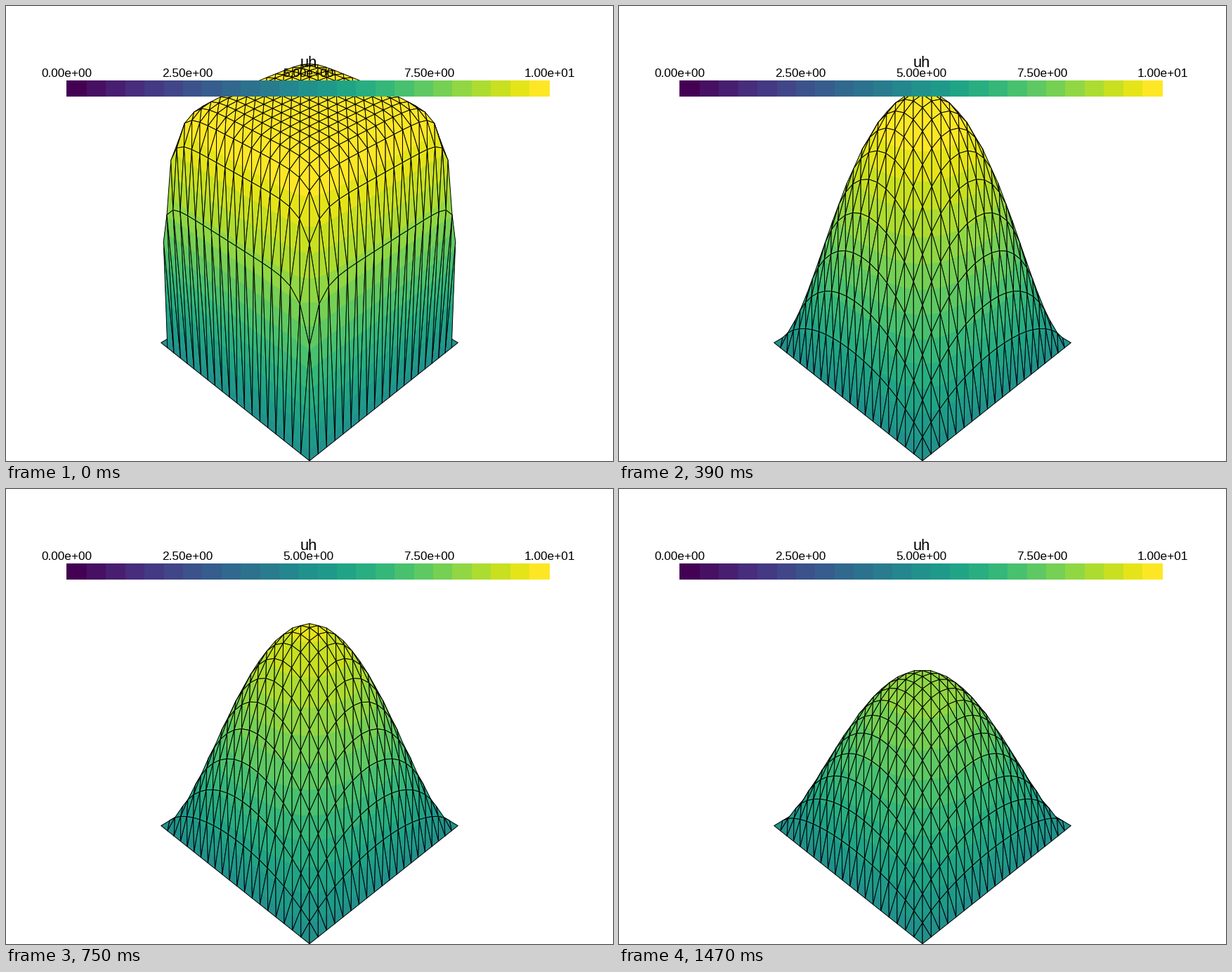
Recreate the animation shown at these times as a matplotlib script. Size 864x648 px, loop 1.5 s.

```python
import numpy as np
import matplotlib
import matplotlib.pyplot as plt
from matplotlib.animation import FuncAnimation
from matplotlib.collections import PolyCollection

W, H, DPI = 864, 648, 100
PT = 72 / DPI                      # points per pixel
STEPS, INTERVAL = 50, 30
N, HALF = 20, 2.0                  # cells per side, half side length
EDGE, START = 5.0, 10.0            # boundary and initial temperature
DIFFUSION, SOURCE = 0.04, 0.1      # both per time step
BINS, TOP = 25, 10.0
BIN = TOP / BINS
COLORS = matplotlib.colormaps["viridis"](np.linspace(0, 1, BINS))


def build_mesh():
    """Square grid, each cell split along its (1, 1) diagonal, far cells first."""
    line = np.linspace(-HALF, HALF, N + 1)
    xy = np.array([(x, y) for y in line for x in line])
    tris = []
    for j in range(N):
        for i in range(N):
            a = j * (N + 1) + i
            b, c, d = a + 1, a + N + 1, a + N + 2
            tris += [(a, b, d), (d, c, a)]
    tris = np.array(tris)
    depth = xy[tris].sum(axis=(1, 2))
    return xy, tris[np.argsort(depth, kind="stable")]


def solve_heat(xy, tris):
    """Linear finite elements in space, backward Euler in time."""
    size = len(xy)
    h = 2 * HALF / N
    rows, cols = tris[:, :, None], tris[:, None, :]
    mass, stiff = np.zeros((size, size)), np.zeros((size, size))
    np.add.at(mass, (rows, cols), h * h / 24 * (np.ones((3, 3)) + np.eye(3)))
    np.add.at(stiff, (rows, cols),
              0.5 * np.array([[1, -1, 0], [-1, 2, -1], [0, -1, 1]]))
    inner = np.flatnonzero(np.abs(xy).max(axis=1) < HALF - 1e-9)
    system = (mass + DIFFUSION * stiff)[np.ix_(inner, inner)]
    step = np.linalg.solve(system, mass[inner])
    w = np.full(size, START - EDGE)
    states = []
    for _ in range(STEPS):
        rise = step @ (w + SOURCE)
        w = np.zeros(size)
        w[inner] = rise
        states.append(w + EDGE)
    return states


xy, tris = build_mesh()
states = solve_heat(xy, tris)

# Isometric perspective camera fitted to the first state
low, high = states[0].min(), states[0].max()
mid = (low + high) / 2
radius = np.sqrt(2 * HALF ** 2 + ((high - low) / 2) ** 2)
distance = radius / np.sin(np.radians(15))
focal = H / 2 / np.tan(np.radians(15))


def project(u):
    x, y = xy.T
    z = u - mid
    scale = focal / (distance - (x + y + z) / np.sqrt(3))
    right = (y - x) / np.sqrt(2)
    up = (2 * z - x - y) / np.sqrt(6)
    return np.column_stack([W / 2 + scale * right, H / 2 - scale * up])


def lerp(p, q, vp, vq, level):
    t = np.clip((level - vp) / np.maximum(vq - vp, 1e-9), 0, 1)
    return p + t[:, None] * (q - p)


def surface(u):
    """Per triangle: base fill, the part above each colour level, outline."""
    pts = project(u)[tris]
    e1, e2 = pts[:, 1] - pts[:, 0], pts[:, 2] - pts[:, 0]
    seen = e1[:, 0] * e2[:, 1] - e1[:, 1] * e2[:, 0] < 0
    pts, vals = pts[seen], u[tris][seen]
    order = np.argsort(vals, axis=1)
    vals = np.take_along_axis(vals, order, 1)
    pts = np.take_along_axis(pts, order[:, :, None], 1)

    bins = np.clip(np.floor(vals / BIN).astype(int), 0, BINS - 1)
    count = bins[:, 2] - bins[:, 0] + 2
    tri = np.repeat(np.arange(len(vals)), count)
    k = np.arange(len(tri)) - np.repeat(np.cumsum(count) - count, count)
    outline = k == count[tri] - 1
    v0, v1, v2 = vals[tri].T
    p0, p1, p2 = np.moveaxis(pts[tri], 1, 0)
    band = np.minimum(bins[tri, 0] + k, BINS - 1)
    level = np.where((k == 0) | outline, v0, band * BIN)

    below = (level < v1)[:, None]
    a = np.where(below, lerp(p0, p1, v0, v1, level), lerp(p1, p2, v1, v2, level))
    b = np.where(below, p1, a)
    d = lerp(p0, p2, v0, v2, level)
    faces = COLORS[band]
    faces[outline, 3] = 0
    return np.stack([a, b, p2, d], axis=1), faces, np.where(outline, PT, 0)


fig = plt.figure(figsize=(W / DPI, H / DPI), dpi=DPI, facecolor="white")
ax = fig.add_axes([0, 0, 1, 1])

# Colour bar with its labels
cuts = np.round(np.concatenate([[86], 115 + 27.39 * np.arange(BINS - 1), [774]]))
ax.bar(cuts[:-1], 23, np.diff(cuts), bottom=106, align="edge",
       color=COLORS, linewidth=0, zorder=3)
for i in range(5):
    ax.text(86 + 172 * i, 101, f"{TOP * i / 4:.2e}", ha="center", va="baseline",
            family="Liberation Sans", size=17.2 * PT, zorder=4)
ax.text(431, 87, "uh", ha="center", va="baseline",
        family="Liberation Sans", size=22 * PT, zorder=4)

mesh = PolyCollection([], edgecolors="black", joinstyle="round", zorder=1)
ax.add_collection(mesh, autolim=False)
ax.set_xlim(0, W)
ax.set_ylim(H, 0)
ax.axis("off")


def update(frame):
    quads, faces, widths = surface(states[frame])
    mesh.set_verts(quads)
    mesh.set_facecolor(faces)
    mesh.set_linewidth(widths)
    return (mesh,)


anim = FuncAnimation(fig, update, frames=STEPS, interval=INTERVAL,
                     repeat=True, repeat_delay=0)
plt.show()
```
